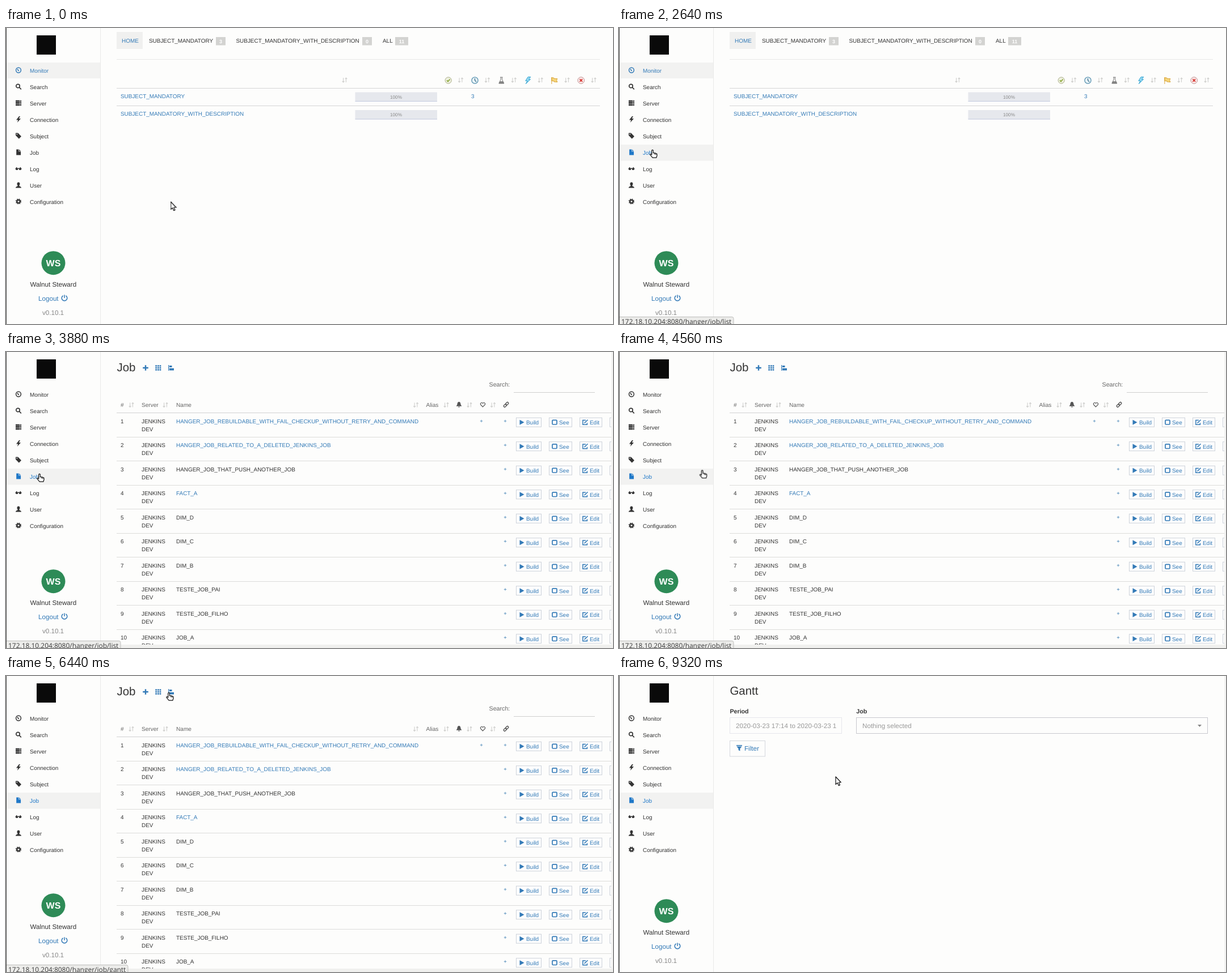
An HTML page that plays this animation: 1070 px wide and 523 px high, repeating every 9.36 s.

```html
<!DOCTYPE html>
<html lang="en">
<head>
<meta charset="utf-8">
<title>Job monitor</title>
<style>
html, body { margin: 0; width: 100%; height: 100%; overflow: hidden; background: #fdfdfc; }
svg { display: block; width: 100%; height: 100%; }
text { font: 9.93px "Liberation Sans", Arial, sans-serif; fill: #333; white-space: pre; text-rendering: geometricPrecision; }
.link { fill: #337ab7; }
.head { font-size: 10.1px; fill: #666; }
.mid { font-size: 11.65px; }
.title { font-size: 20.4px; }
.label { font-size: 10.65px; font-weight: bold; }
.tiny { font-size: 8.2px; fill: #888; }
.badge { font-size: 9px; font-weight: bold; fill: #fff; }
.status text { font: 11.95px "Open Sans", "Noto Sans", sans-serif; fill: #3c3c3c; }
.status path { fill: #ececea; stroke: #bdbdbb; }
.line { fill: none; stroke: #dcdcda; }
.btn { fill: #fdfdfd; stroke: #ccd2da; }

.anim { animation: 9360ms step-end infinite; }
.monitor { animation-name: monitor; }
.loading { animation-name: loading; }
.jobs { animation-name: jobs; }
.gantt { animation-name: gantt; }
.logo { animation-name: logo; }
.hover { animation-name: hover; }
.item-monitor { animation-name: item-monitor; }
.item-job { animation-name: item-job; }
.job-url { animation-name: job-url; }
.gantt-url { animation-name: gantt-url; }
.account { animation-name: account; }
.hand { animation-name: hand; }
.arrow { animation-name: arrow; }
.cursor { animation: move 9360ms ease-in-out infinite; }

@keyframes monitor { 0% { visibility: visible } 32.05%, 100% { visibility: hidden } }
@keyframes loading { 0% { visibility: hidden } 32.05% { visibility: visible } 37.61%, 100% { visibility: hidden } }
@keyframes jobs { 0% { visibility: hidden } 37.61% { visibility: visible } 72.65%, 100% { visibility: hidden } }
@keyframes gantt { 0% { visibility: hidden } 72.65%, 100% { visibility: visible } }
@keyframes logo { 0% { visibility: visible } 32.05% { visibility: hidden } 37.61%, 100% { visibility: visible } }
@keyframes hover { 0% { visibility: hidden } 12.39%, 100% { visibility: visible } }
@keyframes item-monitor { 0% { fill: #337ab7; color: #337ab7 } 32.05%, 100% { fill: #333; color: #333 } }
@keyframes item-job { 0% { fill: #333; color: #333 } 12.39%, 100% { fill: #1f78c8; color: #1f78c8 } }
@keyframes job-url {
  0% { visibility: hidden } 12.39% { visibility: visible } 32.05% { visibility: hidden }
  37.61% { visibility: visible } 49.15%, 100% { visibility: hidden }
}
@keyframes gantt-url { 0% { visibility: hidden } 56.41% { visibility: visible } 72.65%, 100% { visibility: hidden } }
@keyframes account { 0% { transform: none } 37.61% { transform: translateY(-10px) } 72.65%, 100% { transform: none } }
@keyframes hand {
  0% { visibility: hidden } 12.39% { visibility: visible } 49.15% { visibility: hidden }
  56.41% { visibility: visible } 72.65%, 100% { visibility: hidden }
}
@keyframes arrow {
  0% { visibility: visible } 12.39% { visibility: hidden } 49.15% { visibility: visible }
  56.41% { visibility: hidden } 72.65%, 100% { visibility: visible }
}
@keyframes move {
  0%, 6.41% { transform: translate(290.5px, 307px); animation-timing-function: ease-in }
  12.39% { transform: translate(164px, 228px); animation-timing-function: ease-out }
  14.96%, 45.73% { transform: translate(59px, 215px); animation-timing-function: ease-in }
  49.15% { transform: translate(168px, 207px); animation-timing-function: ease-out }
  55.56% { transform: translate(286.5px, 31px) }
  56.84%, 85.47% { transform: translate(287px, 29px) }
  96.15%, 100% { transform: translate(382px, 178px) }
}
</style>
</head>
<body>
<svg viewBox="0 0 1070 523" preserveAspectRatio="none">
  <defs>
    <g id="dash" fill="none" stroke="currentColor" stroke-width="1.5"><circle r="4.4"/><path d="M0 1L-2-2.2M0 1h1"/></g>
    <g id="search" fill="none" stroke="currentColor" stroke-width="1.7"><circle cx="-1" cy="-1" r="3.2"/><path d="M1.5 1.5L4.8 4.8"/></g>
    <path id="server" fill="currentColor" fill-rule="evenodd" d="M-5-4.8H5v2.7H-5zM-5-1.4H5v2.7H-5zM-5 2H5v2.7H-5zM1.5-3.9h2.3v.9H1.5zM1.5-.5h2.3v.9H1.5zM1.5 2.9h2.3v.9H1.5z"/>
    <path id="bolt" fill="currentColor" d="M1-5.5L-4 1h3.2L-2 5.5 4-1.4H.6L3-5.5z"/>
    <path id="tag" fill="currentColor" fill-rule="evenodd" d="M-5-5h4.2L5 1 .8 5.2-5-.8zM-3.6-2.8a.9.9 0 1 0 1.8 0 .9.9 0 1 0-1.8 0"/>
    <path id="file" fill="currentColor" d="M-3.8-5H.4v3.8h3.7V5h-7.9zM1.2-5L4.1-2H1.2z"/>
    <path id="glasses" fill="currentColor" d="M-5.2-.4L-3.6-2.6h1.3L-3-1h2.3q.7.5 1.4 0H3L2.3-2.6h1.3L5.2-.4A2.3 2.3 0 1 1 .7.4H-.7A2.3 2.3 0 1 1-5.2-.4z"/>
    <path id="user" fill="currentColor" d="M0-5c3 0 3 4 1.3 6 0 1.6 3.7 1.3 3.7 4H-5c0-2.7 3.7-2.4 3.7-4C-3-1-3-5 0-5z"/>
    <g id="cog" fill="none" stroke="currentColor"><circle r="2.7" stroke-width="2.3"/><circle r="4.2" stroke-width="1.8" stroke-dasharray="1.7 1.6"/></g>
    <g id="sort" fill="none" stroke="#cfcfcd" stroke-width="1.1"><path d="M-2.4-4v8M-4.3 2l1.9 2 1.9-2M2.4 4v-8M.7-2l1.7-2 1.9 2"/></g>
    <path id="plus" fill="none" stroke="currentColor" stroke-width="2.4" d="M-4.8 0h9.6M0-4.8v9.6"/>
    <path id="small-plus" fill="none" stroke="#6699c2" d="M-2.2 0h4.4M0-2.2v4.4"/>
    <path id="grid" fill="none" stroke="currentColor" stroke-width="2.5" stroke-dasharray="2.7 1" d="M-5-3.5H5M-5 0H5M-5 3.5H5"/>
    <path id="bars" fill="currentColor" d="M-5-5h1.2V5H-5zM-3-4h4.5v3H-3zM-3 .8h8v3.6h-8z"/>
    <path id="bell" fill="currentColor" d="M0-5c3 0 2.8 4 3.2 5L4.8 2.8h-9.6L-3.2 0c.4-1 .2-5 3.2-5zM-1.4 3.5h2.8a1.4 1.4 0 0 1-2.8 0z"/>
    <path id="heart" fill="none" stroke="currentColor" stroke-width="1.2" d="M0 4L-3.9 0C-5-2 -2-5.4 0-2.2 2-5.4 5-2 3.9 0z"/>
    <g id="chain" fill="none" stroke="currentColor" stroke-width="1.4" transform="rotate(-45)"><rect x="-5.3" y="-1.8" width="5.8" height="3.6" rx="1.8"/><rect x="-.5" y="-1.8" width="5.8" height="3.6" rx="1.8"/></g>
    <path id="play" fill="currentColor" d="M-3.5-4.5L4.5 0-3.5 4.5z"/>
    <rect id="box" x="-4" y="-3.8" width="8" height="7.6" rx="1.2" fill="none" stroke="currentColor" stroke-width="1.7"/>
    <path id="pen" fill="none" stroke="currentColor" stroke-width="1.5" d="M1-3.8h-5.2v7.8h7.6V1M-1.5 1.4L4.5-4.4"/>
    <path id="trash" fill="none" stroke="currentColor" stroke-width="1.2" d="M-4.6-3.4h9.2M-1.5-3.6v-1.3h3v1.3M-3.6-2.5v7h7.2v-7M-1.2-1.5v4.8M1.2-1.5v4.8"/>
    <path id="funnel" fill="currentColor" d="M-5-5.3H5v1.6H-5zM-4.6-2.9h9.2L1.4 1v4.2L-1.4 3.8V1z"/>
    <path id="power" fill="none" stroke="currentColor" stroke-width="1.5" d="M-2.5-4a4.8 4.8 0 1 0 5 0M0-5.6V0"/>
    <g id="ok" fill="none"><circle r="5.6" fill="#eef0df" stroke="#a9ad87"/><path stroke="#8ca83a" stroke-width="1.8" d="M-2.6 0L-.6 2 2.8-2"/></g>
    <g id="clock" fill="none"><circle r="5.6" fill="#e8f3f8" stroke="#5a93b0" stroke-width="1.3"/><path stroke="#356a86" stroke-width="1.2" d="M0-3.5V0L2.5 2.5"/></g>
    <g id="flask" fill="none" stroke="#777"><path d="M-2.3-5.5h4.6M-1.2-5.5v4L-4.5 5.5h9L1.2-1.5v-4"/><path fill="#888" d="M-2.7 2.3h5.4l1 2.6h-7.4z"/></g>
    <path id="flash" fill="#9bdcf5" stroke="#2b9fce" d="M0-6L-4.3.8h3.4L-3.8 6 4.4-1.8H1L4.7-6z"/>
    <path id="flag" fill="#f6d67b" stroke="#d9a63d" d="M-5-5.5V6.5M-5-5l4 .7v1.1l6 .3-1.3 2.7L5 3-1 2.5V1.2L-5 1z"/>
    <g id="fail" fill="none"><circle r="5.8" fill="#fbeeee" stroke="#bc8b8b"/><path stroke="#d83a35" stroke-width="1.8" d="M-2.4-2.4l4.8 4.8M2.4-2.4l-4.8 4.8"/></g>
    <clipPath id="view"><rect width="1067" height="517"/></clipPath>
  </defs>

  <rect width="1070" height="523" fill="#fdfdfc"/>
  <g id="pages"></g>
  <g id="sidebar"></g>

  <g class="anim status job-url"><path d="M-1 510.5H199q3 0 3 3V524H-1z"/><text x="4" y="523">172.18.10.204:8080/hanger/job/list</text></g>
  <g class="anim status gantt-url"><path d="M-1 510.5H212q3 0 3 3V524H-1z"/><text x="4" y="523">172.18.10.204:8080/hanger/job/gantt</text></g>
  <g class="anim status loading"><path d="M-1 510.5H265q3 0 3 3V524H-1z"/><text x="4" y="523">Transferring data from 172.18.10.204…</text></g>

  <rect width="1" height="523" fill="#444"/>
  <g class="cursor" stroke-linejoin="round">
    <path class="anim arrow" fill="#fff" stroke="#111" stroke-width="1.2" d="M0 0V13.6L3.1 10.8 5.2 15.6 7.4 14.6 5.4 10H9.3z"/>
    <path class="anim hand" fill="#fff" stroke="#111" stroke-width="1.2" d="M-1.3 9V1.3Q0-.6 1.3 1.3V6Q2.8 4.9 3.8 6.3 5.2 5.4 6 6.8 8 6.4 8 8.2V10.5L6.8 14.2H.2L-4 9.2Q-4.6 7.4-2.8 7.6zM3.8 6.5v2M6 7v2"/>
  </g>
</svg>
<script>
const BLUE = '#337ab7';
const text = (x, y, s, cls = '', extra = '') => `<text x="${x}" y="${y}" class="${cls}" ${extra}>${s}</text>`;
const rect = (x, y, w, h, fill) => `<rect x="${x}" y="${y}" width="${w}" height="${h}" fill="${fill}"/>`;
const icon = (id, x, y, color = '#555') => `<use href="#${id}" x="${x}" y="${y}" style="color:${color}"/>`;
const hline = (x1, x2, y, color = '#dcdcda') => `<path class="line" style="stroke:${color}" d="M${x1} ${y}H${x2}"/>`;
const page = (name, body) => `<g class="anim ${name}">${body}</g>`;
const centered = 'text-anchor="middle"';

function sidebar() {
  const items = [['Monitor', 'dash'], ['Search', 'search'], ['Server', 'server'], ['Connection', 'bolt'], ['Subject', 'tag'],
    ['Job', 'file'], ['Log', 'glasses'], ['User', 'user'], ['Configuration', 'cog']];
  const menu = items.map(([name, id], i) => {
    const y = 75 + 29 * i;
    const cls = i === 0 || i === 5 ? `anim item-${name.toLowerCase()}` : '';
    return `<g class="${cls}" style="color:#333"><use href="#${id}" x="22" y="${y - .5}"/>` +
      text(42, y + 3.7, name, cls) + '</g>';
  }).join('');
  return page('monitor', rect(1, 61, 165, 28, '#f2f2f1')) +
    page('hover', rect(1, 206, 165, 28.5, '#f2f2f1')) +
    '<path class="line" style="stroke:#eaeae8" d="M166.5 0V523"/>' +
    page('logo', rect(54, 13, 34, 34, '#0a0a0a')) + menu +
    page('account', '<circle cx="83.5" cy="415.2" r="21" fill="#2e8b57"/>' +
      text(83.5, 421, 'WS', '', centered + ' style="font-size:16px;font-weight:bold;fill:#fff"') +
      text(83.3, 457, 'Walnut Steward', 'mid', centered) +
      text(57, 482, 'Logout', 'mid link') + icon('power', 103, 477, BLUE) +
      text(83, 506.5, 'v0.10.1', 'mid', centered + ' style="fill:#888"'));
}

function monitor() {
  const badge = (x, w, n) => rect(x, 16, w, 14.5, '#d3d3d1') + text(x + w / 2, 26.5, n, 'badge', centered);
  const bar = y => rect(615.5, y, 144.5, 16.5, '#e6e8ed') + hline(615.5, 760, y + 16, '#c3cadf') +
    text(687.5, y + 11, '100%', 'tiny', centered);
  const kinds = ['ok', 'clock', 'flask', 'flash', 'flag', 'fail'];
  return page('monitor', rect(195, 7, 46, 30, '#f0f0ef') + text(204, 26, 'HOME', 'link') +
    text(252, 26, 'SUBJECT_MANDATORY') + badge(370, 17, 3) +
    text(405.5, 26, 'SUBJECT_MANDATORY_WITH_DESCRIPTION') + badge(628, 17, 0) +
    text(664, 26, 'ALL') + badge(686, 23, 11) +
    hline(195, 1047, 55.5, '#e8e8e6') + icon('sort', 597, 92) +
    kinds.map((k, i) => icon(k, 779.7 + 46.8 * i, 92.5) + icon('sort', 801.5 + 46.9 * i, 92)).join('') +
    hline(195, 1047, 106.5, '#d5d5d6') + text(202, 123.5, 'SUBJECT_MANDATORY', 'link') + bar(113.5) +
    text(820, 123.5, '3', 'link') + hline(195, 1047, 137.5, '#d5d5d6') +
    text(202, 155, 'SUBJECT_MANDATORY_WITH_DESCRIPTION', 'link') + bar(145));
}

const names = ['HANGER_JOB_REBUILDABLE_WITH_FAIL_CHECKUP_WITHOUT_RETRY_AND_COMMAND',
  'HANGER_JOB_RELATED_TO_A_DELETED_JENKINS_JOB', 'HANGER_JOB_THAT_PUSH_ANOTHER_JOB', 'FACT_A',
  'DIM_D', 'DIM_C', 'DIM_B', 'TESTE_JOB_PAI', 'TESTE_JOB_FILHO', 'JOB_A'];
const linked = [0, 1, 3];

const button = (x, y, w, id, label) =>
  `<rect class="btn" x="${x + .5}" y="${y - 8}" width="${w}" height="16"/>` +
  icon(id, x + 10, y, BLUE) + text(x + 18, y + 3.8, label, 'link');

// Shared table; the layout gives column places and row spacing.
function table({ server, name, alias, icons, marks, buttons, top, step, right }) {
  const y0 = top + 28.5;
  const head = text(202, top, '#', 'head') + text(server, top, 'Server', 'head') + text(name, top, 'Name', 'head') +
    text(alias, top, 'Alias', 'head') +
    ['bell', 'heart', 'chain'].map((id, i) => icon(id, icons[i], top - 4)).join('') +
    hline(195, right, top + 10.5, '#d2d2d2');
  const rows = names.map((job, i) => {
    const y = y0 + step * i;
    return text(202, y, i + 1) + text(server, y, 'JENKINS') + text(server, y + 14.2, 'DEV') +
      text(name, y, job, linked.includes(i) ? 'link' : '') +
      (i ? '' : icon('small-plus', marks[0], y - 3.5)) + icon('small-plus', marks[1], y - 3.5) +
      button(buttons[0], y - 1.3, 44, 'play', 'Build') + button(buttons[1], y - 1.3, 40, 'box', 'See') +
      button(buttons[2], y - 1.3, 39, 'pen', 'Edit') + button(buttons[3], y - 1.3, 50, 'trash', 'Delete') +
      hline(195, right, Math.round(top + 10 + step * (i + 1)) + .5);
  }).join('');
  return head + rows;
}

const edge = rect(1067, 0, 3, 523, '#f3f3f2');
const jobTitle = text(195.5, 33.8, 'Job', 'title') +
  icon('plus', 246, 28, BLUE) + icon('grid', 268.3, 28, BLUE) + icon('bars', 291, 28, BLUE);

const loading = () => page('loading', jobTitle + edge + table({
  server: 226, name: 281.5, alias: 722.5, icons: [762, 786, 809], marks: [783.5, 807],
  buttons: [826, 884, 938, 991], top: 63, step: 44.67, right: 1049
}));

const jobs = () => page('jobs', '<g clip-path="url(#view)">' + jobTitle +
  text(851.5, 61.3, 'Search:', '', 'style="font-size:10.7px;fill:#666"') + hline(895, 1038, 71.5, '#cfcfcf') +
  [221, 281, 722.5, 776, 817, 858.5].map(x => icon('sort', x, 93.5)).join('') +
  table({
    server: 239, name: 300, alias: 740.5, icons: [798.5, 840.5, 881.5], marks: [838, 880],
    buttons: [899, 957, 1011, 1064], top: 97, step: 42.5, right: 1067
  }) + '</g>' + edge + rect(0, 517, 1070, 6, '#f0f0ee'));

function gantt() {
  const field = (x, y, w, h, color) => `<rect x="${x}" y="${y}" width="${w}" height="${h}" fill="none" stroke="${color}"/>`;
  return page('gantt', edge + text(195.5, 33.3, 'Gantt', 'title') +
    text(195.5, 65.5, 'Period', 'label') + text(418.3, 65.5, 'Job', 'label') +
    field(195.5, 73.5, 197, 28, '#e6e6ec') +
    text(206, 91.8, '2020-03-23 17:14 to 2020-03-23 1', 'mid', 'style="fill:#999"') +
    field(418.5, 73.5, 619, 28, '#c8c8ce') + text(429, 91.8, 'Nothing selected', 'mid', 'style="fill:#999"') +
    '<path fill="#888" d="M1020 86h7l-3.5 4z"/>' +
    field(195.5, 114.5, 62, 27.5, '#d4d7dd') + icon('funnel', 212, 127.3, BLUE) + text(221, 132.3, 'Filter', 'mid link'));
}

document.getElementById('pages').innerHTML = monitor() + loading() + jobs() + gantt();
document.getElementById('sidebar').innerHTML = sidebar();
</script>
</body>
</html>
```
